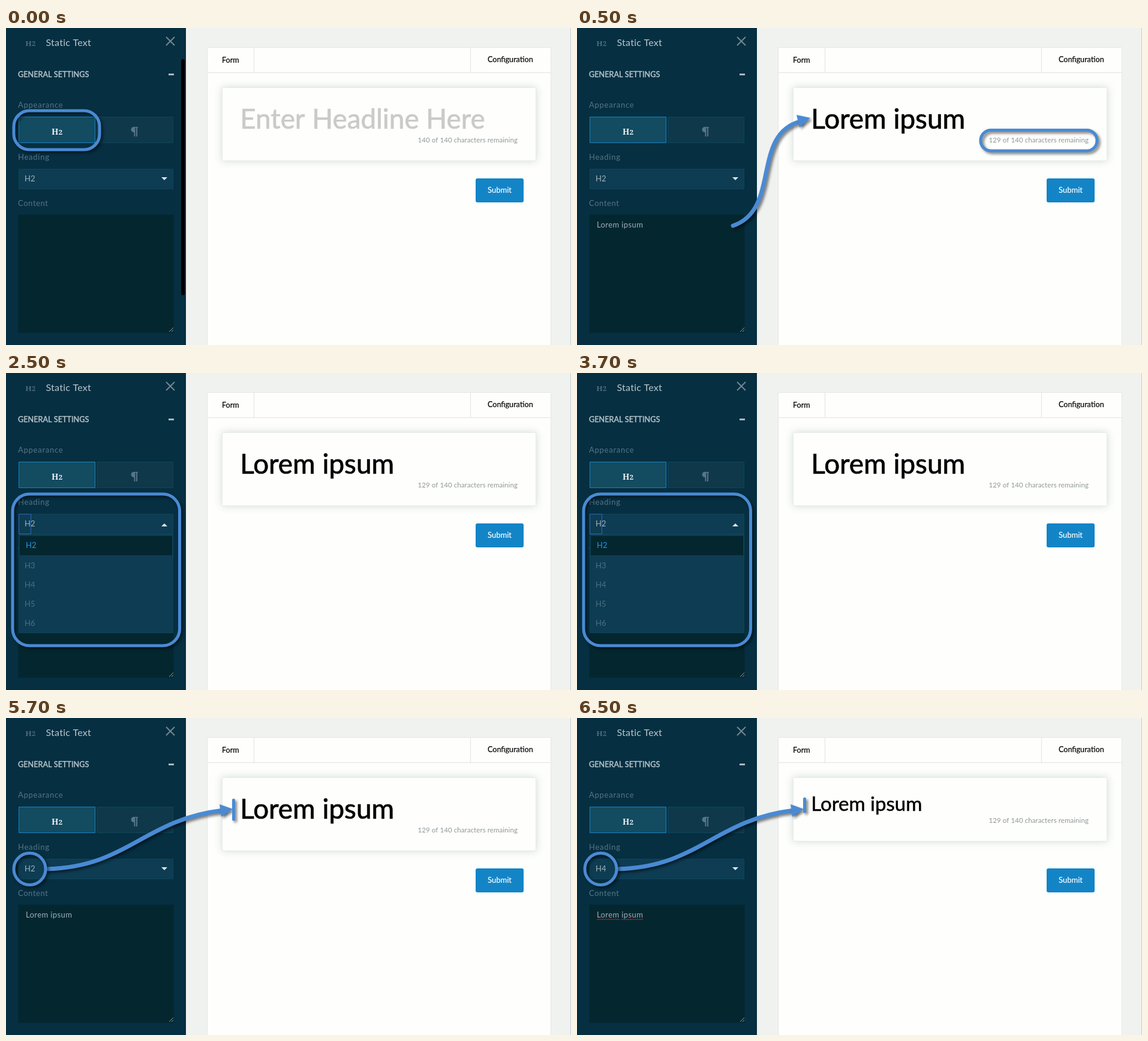
Animation, 942 px wide and 529 px high, one loop 8 s. Source, as an HTML page with a canvas:

```html
<!DOCTYPE html>
<html lang="en">
<head>
<meta charset="utf-8">
<title>Static text settings</title>
<style>
html, body { margin: 0; width: 100%; height: 100%; overflow: hidden; background: #f0f2f0; }
canvas { display: block; }
</style>
</head>
<body>
<canvas id="stage" width="942" height="529"></canvas>
<script>
const ctx = document.getElementById('stage').getContext('2d');
const SANS = 'Lato, "Open Sans", sans-serif';
const SERIF = '"Noto Serif", "Liberation Serif", serif';
const BLUE = '#4a8ad4';
const FIELD = '#0e3c52';
const DARK = '#04262f';
const LABEL = '#557586';
const LOOP = 8000;

const scenes = [
  { until: 500, heading: 'H2', empty: true, notes: noteTab },
  { until: 2500, heading: 'H2', notes: noteContent },
  { until: 4500, heading: 'H2', open: true, notes: noteMenu },
  { until: 6500, heading: 'H2', notes: () => noteHeading(135, 170) },
  { until: LOOP, heading: 'H4', spell: true, notes: () => noteHeading(133, 157) }
];

function box(x, y, w, h, fill, border, r = 0) {
  ctx.beginPath();
  ctx.roundRect(x, y, w, h, r);
  ctx.fillStyle = fill;
  ctx.fill();
  if (!border) return;
  ctx.beginPath();
  ctx.roundRect(x + 0.5, y + 0.5, w - 1, h - 1, r);
  ctx.strokeStyle = border;
  ctx.lineWidth = 1;
  ctx.stroke();
}

function line(color, width, ...p) {
  ctx.beginPath();
  for (let i = 0; i < p.length; i += 2) ctx.lineTo(p[i], p[i + 1]);
  ctx.strokeStyle = color;
  ctx.lineWidth = width;
  ctx.stroke();
}

function poly(color, ...p) {
  ctx.beginPath();
  for (let i = 0; i < p.length; i += 2) ctx.lineTo(p[i], p[i + 1]);
  ctx.closePath();
  ctx.fillStyle = color;
  ctx.fill();
}

// weight adds a thin outline for strengths between regular and bold
function text(str, x, y, size, color, { gap = 0, weight = 0, font = SANS, style = '', align = 'left' } = {}) {
  ctx.font = `${style} ${size}px ${font}`;
  ctx.letterSpacing = gap + 'px';
  ctx.textAlign = align;
  ctx.fillStyle = color;
  ctx.fillText(str, x, y);
  if (weight) {
    ctx.strokeStyle = color;
    ctx.lineWidth = weight;
    ctx.lineJoin = 'round';
    ctx.strokeText(str, x, y);
  }
}

function headingIcon(x, y, size, color) {
  const opt = { font: SERIF, style: 'bold' };
  text('H', x, y, size, color, { ...opt, font: '"Liberation Serif", serif' });
  text('2', x + size * 0.82, y, size * 0.82, color, opt);
}

function pilcrow(x, y, color) {
  ctx.fillStyle = color;
  ctx.beginPath();
  ctx.arc(x + 5, y + 4.5, 4.5, Math.PI / 2, Math.PI * 1.5);
  ctx.lineTo(x + 12, y);
  ctx.lineTo(x + 12, y + 1.5);
  ctx.lineTo(x + 7, y + 1.5);
  ctx.lineTo(x + 7, y + 9);
  ctx.fill();
  ctx.fillRect(x + 5.5, y, 2, 16);
  ctx.fillRect(x + 9, y, 2, 16);
}

function menu() {
  box(21, 269, 258, 165, FIELD, '#0d4559');
  box(23, 272, 254, 32, DARK);
  text('H2', 33, 292, 13, '#2196e3');
  for (let i = 3; i <= 6; i++) text('H' + i, 31, 326 + (i - 3) * 32, 13, '#4a7183');
  line('#2f68b4', 1, 21.5, 268.5, 21.5, 235.5, 41.5, 235.5, 41.5, 268.5, 21.5, 268.5);
}

function squiggle(x0, x1, y) {
  ctx.beginPath();
  for (let x = x0; x <= x1; x++) ctx.lineTo(x, y + Math.sin((x - x0) * Math.PI / 2));
  ctx.strokeStyle = '#d8201c';
  ctx.lineWidth = 1;
  ctx.stroke();
}

function sidebar(s) {
  box(0, 0, 300, 529, '#062f41');
  headingIcon(32.5, 30, 13, '#4f6f7e');
  text('Static Text', 66.5, 30, 16, '#b9c8ce', { gap: 0.25 });
  line('#718690', 2.1, 267, 15, 281, 29);
  line('#718690', 2.1, 281, 15, 267, 29);
  text('GENERAL SETTINGS', 20, 82, 12.6, '#b4c4cb', { gap: 0.05, weight: 0.45 });
  box(271, 76, 9, 3, '#a9bac2');
  if (s.empty) box(292, 52, 6, 394, '#000', null, 3);

  text('Appearance', 20, 133, 13, LABEL, { gap: 0.75 });
  box(21, 148, 128, 44, '#134b61', '#1583c4');
  box(151, 148, 128, 44, '#0f384b', '#0d4559');
  headingIcon(76.3, 178, 14, '#f2f6f7');
  pilcrow(208, 165, '#567586');

  text('Heading', 20, 220, 13, LABEL, { gap: 0.75 });
  text('Content', 20, 297, 13, LABEL, { gap: 0.6 });
  box(20, 311, 260, 198, DARK, '#052b37', 2);
  line('#91a0a6', 1, 272, 507, 279, 500);
  line('#91a0a6', 1, 276, 507, 279, 504);
  if (!s.empty) text('Lorem ipsum', 33, 333, 13, '#9fb1b9', { gap: 0.4 });
  if (s.spell) {
    squiggle(33, 71, 336);
    squiggle(74, 110, 336);
  }

  box(21, 235, 258, 34, FIELD, '#0d4559');
  text(s.heading, 31, 256, 13, '#9fb3bc');
  if (s.open) {
    poly('#dbe6ea', 259, 256, 264, 251, 269, 256);
    menu();
  } else {
    poly('#dbe6ea', 259, 249, 269, 249, 264, 254);
  }
}

function preview(s) {
  const small = s.heading === 'H4';
  const bottom = small ? 206 : 222;
  box(300, 0, 642, 529, '#f0f2f0');
  line('#c3ccd0', 1, 941.5, 0, 941.5, 529);
  box(335, 32, 574, 520, '#fefffd', '#e5e7e5');
  line('#e2e4e2', 1, 336, 74.5, 908, 74.5);
  line('#e2e4e2', 1, 413.5, 33, 413.5, 74);
  line('#e2e4e2', 1, 774.5, 33, 774.5, 74);
  text('Form', 360, 58, 12.6, '#000', { weight: 0.2 });
  text('Configuration', 803, 57, 12.6, '#000', { weight: 0.2 });

  ctx.save();
  ctx.shadowColor = 'rgba(20, 50, 45, 0.18)';
  ctx.shadowBlur = 13;
  box(360, 99, 524, bottom - 99, '#fefffd');
  ctx.restore();
  box(360, 99, 524, bottom - 99, '#fefffd', '#e6ebe9');

  const title = s.empty ? 'Enter Headline Here' : 'Lorem ipsum';
  const size = small ? 33 : 45.8;
  text(title, 390.3, small ? 155 : 168, size, s.empty ? '#c9cac9' : '#000', { weight: size / 65 });
  const left = s.empty ? 140 : 129;
  text(left + ' of 140 characters remaining', 853, bottom - 31, 11.5, '#8f9696', { gap: 0.08, align: 'right' });

  box(783, 251, 80, 40, '#1385c7', null, 3);
  text('Submit', 803, 275, 13, '#fff', { weight: 0.2 });
}

function outline(x, y, w, h, r) {
  ctx.beginPath();
  ctx.roundRect(x, y, w, h, r);
  ctx.strokeStyle = BLUE;
  ctx.lineWidth = 5;
  ctx.stroke();
}

function arrow(curve, head) {
  ctx.beginPath();
  ctx.moveTo(curve[0], curve[1]);
  ctx.bezierCurveTo(...curve.slice(2));
  ctx.strokeStyle = BLUE;
  ctx.lineWidth = 6.8;
  ctx.lineCap = 'round';
  ctx.stroke();
  poly(BLUE, ...head);
}

function noteTab() {
  outline(13, 138, 143, 65, 26);
}

function noteContent() {
  arrow([260, 330, 340, 303, 290, 178, 372, 156], [366, 145, 389, 150, 371, 166]);
  outline(673, 170.5, 194, 34.5, 17);
}

function noteMenu() {
  outline(11, 202, 278.5, 253, 28);
}

function noteHeading(top, bottom) {
  arrow([68, 252, 205, 248, 228, 170, 362, 154], [356, 144, 378, 152, 359, 165]);
  outline(13, 225.5, 53, 53, 26.5);
  line(BLUE, 5, 379.5, top + 2, 379.5, bottom - 1);
}

function draw(now) {
  const t = now % LOOP;
  const s = scenes.find(scene => t < scene.until);
  preview(s);
  sidebar(s);
  ctx.save();
  ctx.shadowColor = 'rgba(0, 0, 0, 0.5)';
  ctx.shadowBlur = 4;
  ctx.shadowOffsetX = 3;
  ctx.shadowOffsetY = 3;
  s.notes();
  ctx.restore();
}

const start = performance.now();
function tick() {
  draw(performance.now() - start);
  requestAnimationFrame(tick);
}
tick();
</script>
</body>
</html>
```
